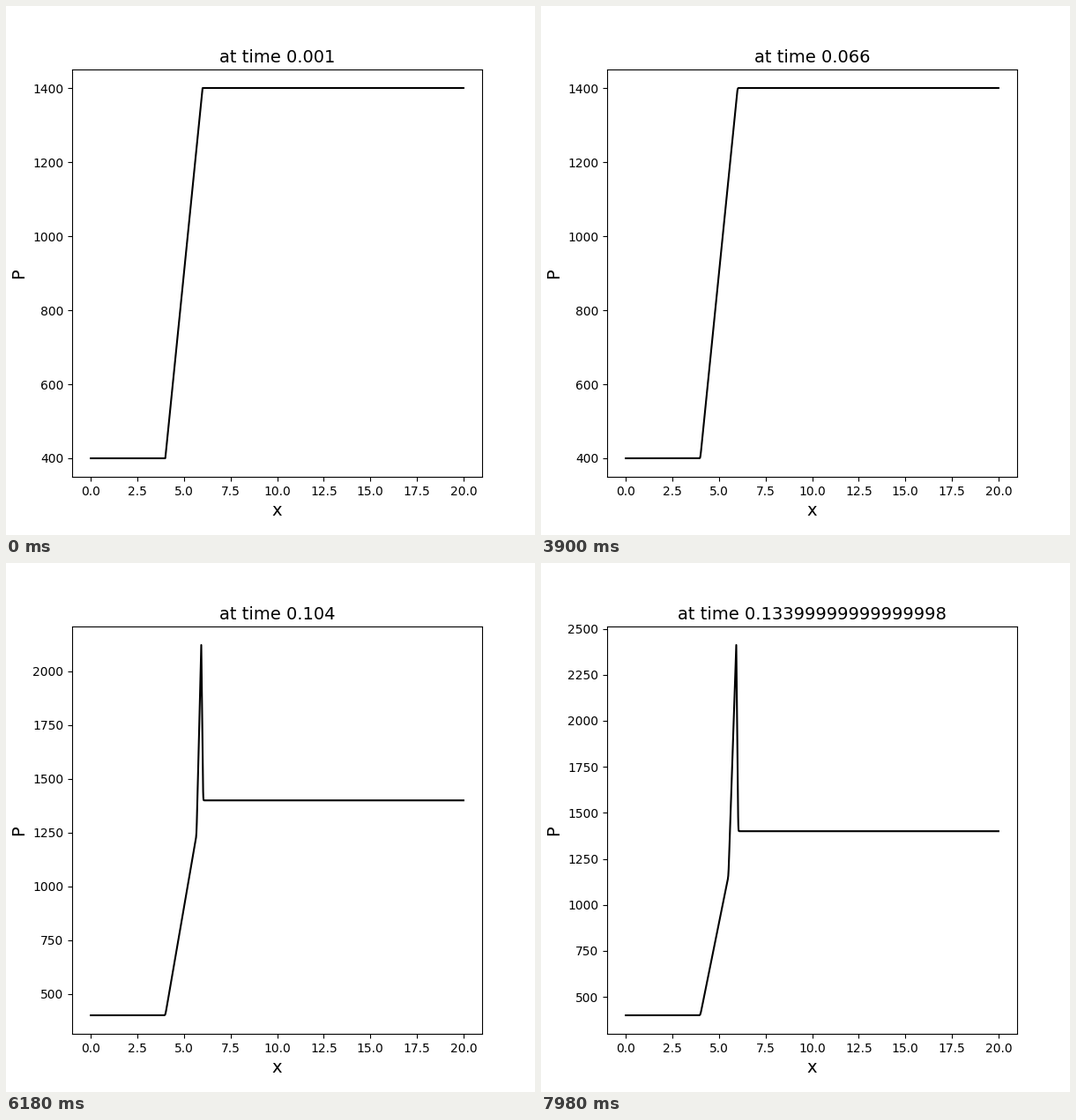
Recreate the animation shown at these times as a matplotlib script. Size 600x600 px, loop 8000 ms.

```python
import numpy as np
import matplotlib.pyplot as plt
from matplotlib.animation import FuncAnimation

TICK = 20            # ms per animation frame
LOOP = 8000          # ms per loop
HOLD = 3             # animation frames per simulation step
DT = 1e-6            # solver time step, 1000 of them per shown step

LOW, HIGH = 400, 1400
SLOPE = 500
X_PEAK = 5.93
CEILING = 1085       # overshoot the spike tends to

# Spike history, in ms of simulated time
KEY_T = [83.7, 90, 104, 122, 134]
OVERSHOOT = np.array([0, 304, 723, 937, 1011.5])
RATE = -np.log(1 - OVERSHOOT / CEILING)
REACH = [0.03, 0.08, 0.255, 0.375, 0.42]
FOOT = [0.06, 0.075, 0.10, 0.105, 0.105]

x = np.linspace(0, 20, 2001)
i_peak = int(np.argmin(abs(x - X_PEAK)))


def soft(u, w):
    """max(u, 0) with a corner rounded over width w."""
    return w * np.logaddexp(0, u / w)


def pressure(ms):
    w = 0.0015 * np.sqrt(ms)
    p = LOW + SLOPE * (soft(x - 4, w) - soft(x - 6, w))
    if ms > KEY_T[0]:
        rise = CEILING * (1 - np.exp(-np.interp(ms, KEY_T, RATE)))
        reach = np.interp(ms, KEY_T, REACH)
        foot = np.interp(ms, KEY_T, FOOT)
        d = x - X_PEAK
        left = soft(d + reach, 0.010) / soft(reach, 0.010)
        right = soft(foot - d, 0.008) / soft(foot, 0.008)
        p = p + (HIGH + rise - p[i_peak]) * np.minimum(left, right)
    return p


fig, ax = plt.subplots(figsize=(6, 6), dpi=100)
line, = ax.plot(x, pressure(1), color="black", lw=1.5)
ax.set_xlim(-1, 21)
ax.set_xlabel("x", fontsize=14)
ax.set_ylabel("P", fontsize=14)
title = ax.set_title("", fontsize=14, y=1.0)


def update(frame):
    step = frame // HOLD + 1
    p = pressure(step)
    line.set_ydata(p)
    top = max(p.max(), HIGH)
    pad = 0.05 * (top - LOW)
    ax.set_ylim(LOW - pad, top + pad)
    title.set_text(f"at time {step * 1000 * DT}")
    return line, title


anim = FuncAnimation(fig, update, frames=LOOP // TICK, interval=TICK,
                     repeat=True, repeat_delay=0, blit=False)
plt.show()
```
